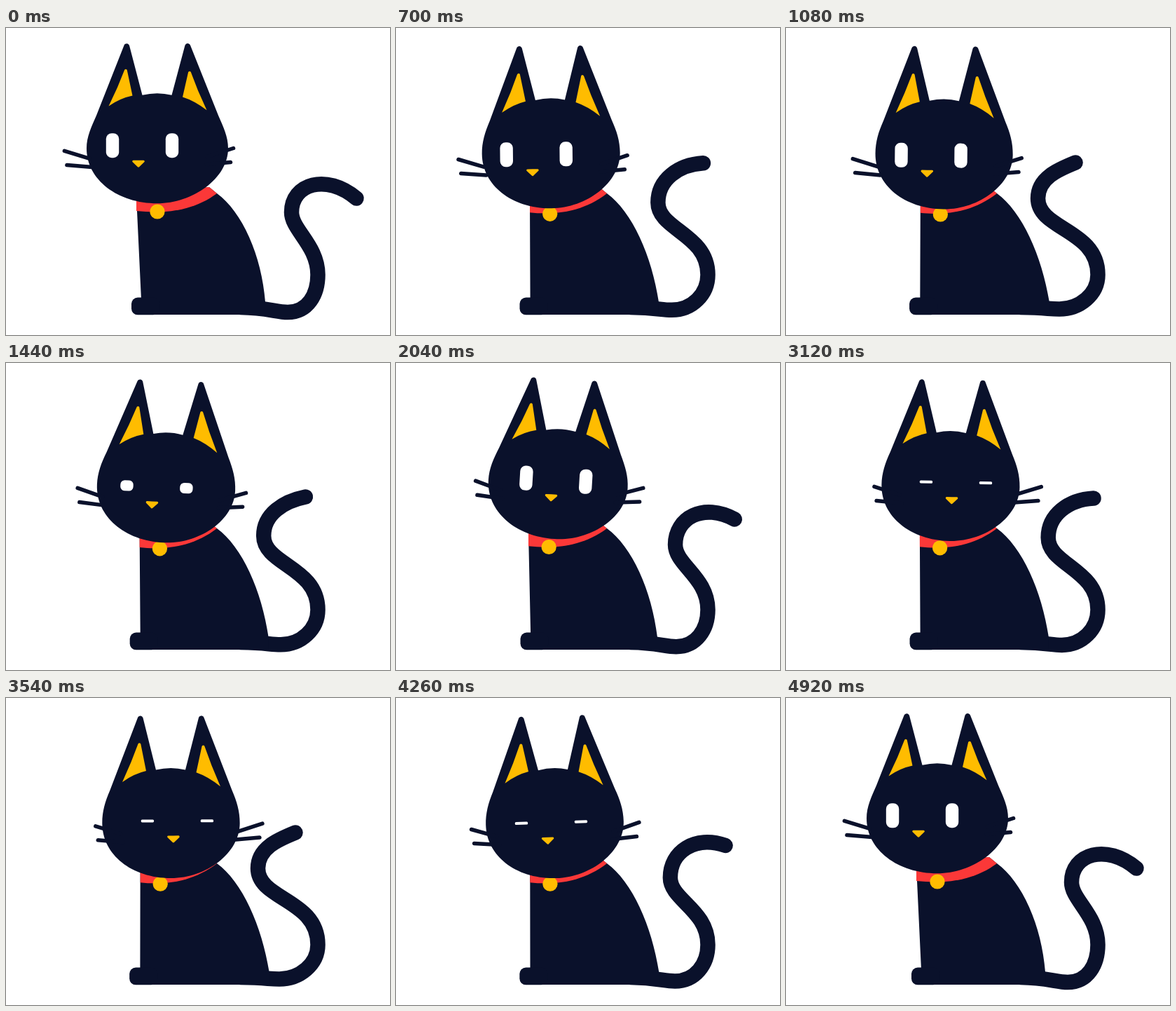
Recreate the animation shown at these times as an HTML page with a canvas. Size 548x438 px, loop 4.94 s.

```html
<!DOCTYPE html>
<html lang="en">
<head>
<meta charset="utf-8">
<title>Black cat</title>
<style>
html, body { margin: 0; width: 100%; height: 100%; overflow: hidden; background: #fff; }
canvas { display: block; width: 548px; height: 438px; }
</style>
</head>
<body>
<canvas id="stage" width="548" height="438"></canvas>
<script>
const ctx = document.getElementById('stage').getContext('2d');
const LOOP = 4940;
const INK = '#0a112b', GOLD = '#ffbc00', RED = '#fb3838';

const mix = (a, b, u) => a + (b - a) * u;
const clamp = x => Math.max(0, Math.min(1, x));

// Smooth looping curve through [time, value] keys, resting at its extremes.
function track(...keys) {
  const n = keys.length;
  const at = i => keys[(i + n) % n][0] + Math.floor(i / n) * LOOP;
  const val = i => keys[(i + n) % n][1];
  const rate = i => (val(i + 1) - val(i)) / (at(i + 1) - at(i));
  const slope = i => {
    const a = rate(i - 1), b = rate(i);
    return a * b <= 0 ? 0 : 2 * a * b / (a + b);
  };
  return t => {
    let i = n - 1;
    while (at(i) > t) i--;
    const d = at(i + 1) - at(i), u = (t - at(i)) / d, v = 1 - u;
    return mix(val(i), val(i + 1), u * u * (3 - 2 * u)) +
      d * u * v * (slope(i) * v - slope(i + 1) * u);
  };
}

const swing = track([0, 0], [1100, 1], [2400, 0], [3540, 1], [4720, 0]);
const bob = track([0, 0], [950, 1], [2350, 0], [4000, 1]);
const headX = track([0, 216], [1440, 228.5], [3650, 235.5]);
const faceX = track([0, -21.5], [700, -21], [2660, 4.5], [3650, 9]);
const tilt = track([0, 0], [700, -.01], [1800, .062], [3540, 0], [4260, -.027]);

// 1 while the lids are shut, with short ramps at both ends
const shut = (t, from, to) => clamp(Math.min(t - from, to - t) / 110);

function fill(color, draw) {
  ctx.fillStyle = color;
  ctx.beginPath();
  draw();
  ctx.fill();
}

// k runs from 0 (tail out to the right) to 1 (curled in)
function drawTail(k) {
  const lowX = mix(402, 390, k), lowY = mix(405.5, 401, k);
  const outX = 445, outY = 352;
  const inX = mix(407.5, 359.5, k), inY = mix(263, 243, k);
  const tipX = mix(mix(500, 455, k), mix(455, 413, k), k);
  const tipY = mix(mix(243, 183, k), mix(183, 192, k), k);
  const angle = mix(40, -22, k) * Math.PI / 180, reach = mix(56, 27, k);
  ctx.strokeStyle = INK;
  ctx.lineWidth = 21.5;
  ctx.beginPath();
  ctx.moveTo(335, 398.5);
  ctx.bezierCurveTo(372, 399, lowX - 16, lowY, lowX, lowY);
  ctx.bezierCurveTo(lowX + 29, lowY, outX, outY + 28, outX, outY);
  ctx.bezierCurveTo(outX, outY - mix(42, 65, k), inX, inY + mix(25, 45, k), inX, inY);
  ctx.bezierCurveTo(inX, inY - mix(41, 29, k),
    tipX - reach * Math.cos(angle), tipY - reach * Math.sin(angle), tipX, tipY);
  ctx.stroke();
}

function drawBody(lean, drop) {
  const left = 192 - 6 * lean, foot = 191.3 + 1.7 * lean;
  const paw = 176 + 3 * lean, right = 376 - 6 * lean;
  fill(INK, () => {
    ctx.moveTo(left, 240);
    ctx.lineTo(290, 227);
    ctx.lineTo(301, 236);
    ctx.bezierCurveTo(337, 262, 365, 325, right, 391);
    ctx.lineTo(right, 409);
    ctx.lineTo(foot, 409);
    ctx.lineTo(foot, 388);
  });
  fill(INK, () => ctx.roundRect(paw, 384.5, 40, 24.8, 9));
  fill(RED, () => {
    ctx.moveTo(left, 261 + drop * .7);
    ctx.bezierCurveTo(225, 265 + drop * .6, 266, 262 + drop * .4, 301, 236);
    ctx.lineTo(290, 227);
    ctx.lineTo(200, 232);
    ctx.lineTo(left, 240);
  });
  fill(GOLD, () => ctx.arc(220.5 - 4.5 * lean, 262 + drop, 10.6, 0, 7));
}

function whisker(x, y, dx, dy) {
  ctx.beginPath();
  ctx.moveTo(x, y);
  ctx.lineTo(x + dx, y + dy);
  ctx.stroke();
}

function drawHead(ear, fx, fy, lean, eye) {
  const w = 98 + 3 * lean, apex = -ear - 9;
  fill(INK, () => {
    ctx.moveTo(-87, -47);
    ctx.arcTo(-43, apex, -21.5, -76, 4);
    ctx.lineTo(-21.5, -76);
    ctx.quadraticCurveTo(0, -81, 20.5, -76);
    ctx.arcTo(42.5, apex, 87, -47, 4);
    ctx.lineTo(87, -47);
    ctx.bezierCurveTo(94, -31, w, -17, w, 0);
    ctx.bezierCurveTo(w, 43, 50, 78.5, 0, 78.5);
    ctx.bezierCurveTo(-56, 78.5, -w, 45, -w, 0);
    ctx.bezierCurveTo(-w, -17, -94, -31, -87, -47);
  });

  const grow = (ear - 85) / 65;
  const innerEar = (x, y, x1, y1, x2, y2) => {
    const f = v => (v + 85) * grow - 85;
    fill(GOLD, () => {
      ctx.moveTo((x + x1) / 2, f((y + y1) / 2));
      ctx.arcTo(x, f(y) - 4, x2, f(y2), 2);
      ctx.lineTo(x2, f(y2));
      ctx.quadraticCurveTo((x1 + x2) / 2, f((y1 + y2) / 2) - 4, x1, f(y1));
    });
  };
  innerEar(-44.5, -114, -69.5, -60, -35.5, -75);
  innerEar(45.5, -111, 70.5, -54, 36, -73);

  ctx.strokeStyle = INK;
  ctx.lineWidth = 5.5;
  const lx = .82 * fx - 115, ly = 6.5 + .7 * fy;
  whisker(lx, ly, 36, 11);
  whisker(lx + 3.5, ly + 20, 36, 3);
  const rx = .72 * fx + 124, ry = 3 + .8 * fy;
  whisker(rx, ry, -37, 12);
  whisker(rx - 4, ry + 20, -34, 3);

  for (const x of [fx - 42.5, fx + 42.5]) {
    fill('#fff', () => ctx.roundRect(x - 9.2, fy - eye / 2, 18.4, eye, Math.min(8, eye * .4)));
  }

  const nx = fx - 5.5, ny = fy + 25.5;
  fill(GOLD, () => {
    ctx.moveTo(nx, ny - 4.5);
    ctx.arcTo(nx + 11, ny - 4.5, nx, ny + 6, 1.5);
    ctx.arcTo(nx, ny + 6, nx - 11, ny - 4.5, 1.5);
    ctx.arcTo(nx - 11, ny - 4.5, nx, ny - 4.5, 1.5);
  });
}

function draw(t) {
  const b = bob(t), fx = faceX(t);
  const turn = (fx + 21.5) / 30.5;
  const lean = (1 - b) * (1 - .7 * turn);
  const fy = 6.5 * b - 4.5 * turn - 4;
  const eye = 35 - 31 * Math.max(shut(t, 1370, 1650), shut(t, 2630, 4540));

  ctx.fillStyle = '#fff';
  ctx.fillRect(0, 0, 548, 438);
  ctx.lineCap = ctx.lineJoin = 'round';
  drawTail(swing(t));
  drawBody(lean, 4 * b);
  ctx.save();
  ctx.translate(headX(t), 171.7 + 8.5 * b);
  ctx.rotate(tilt(t));
  drawHead(149.3 + 5 * b, fx, fy, lean, eye);
  ctx.restore();
}

const start = performance.now();
function tick() {
  draw((performance.now() - start) % LOOP);
  requestAnimationFrame(tick);
}
tick();
</script>
</body>
</html>
```
